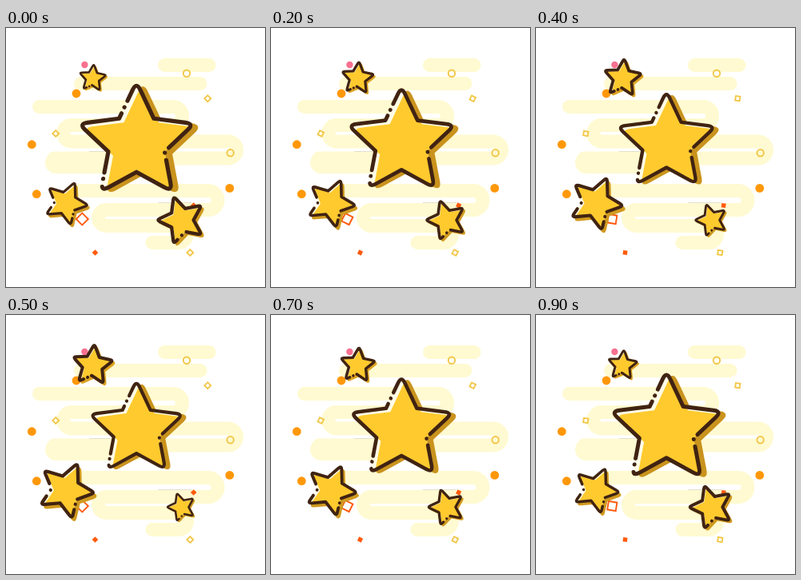
An HTML page that plays this animation: 324 by 324 pixels, repeating every 1 s.

```html
<!DOCTYPE html>
<html lang="en">
<head>
<meta charset="utf-8">
<title>Twinkling stars</title>
<style>
  html, body { margin: 0; width: 100%; height: 100%; overflow: hidden; background: #fff; }
  svg { display: block; width: 100%; height: 100%; }
</style>
</head>
<body>
<svg id="stage" viewBox="0 0 324 324">
  <g fill="none" stroke="#fffad1" stroke-width="17" stroke-linecap="round">
    <path d="M198.500 46.500H254"/>
    <path d="M93.500 69.500H243"/>
    <path d="M41.500 98.500H209a11.500 11.500 0 0 1 0 23H82a10.250 10.250 0 0 0 0 20.500H278a10.500 10.500 0 0 1 0 21H60"/>
    <path d="M90 203.500H253a12 12 0 0 1 0 24H125.500a10 10 0 0 0 0 20H216a10.500 10.500 0 0 1 0 21H183"/>
  </g>
  <rect x="49" y="155" width="126" height="27" rx="13.500" fill="#fffad1"/>
  <path d="M104 154.500H130M190 218.500H232" stroke="#cfcdb8" stroke-width=".6"/>
  <g fill="#ff9808">
    <circle cx="88" cy="82" r="5.400"/>
    <circle cx="32.300" cy="145.700" r="5.400"/>
    <circle cx="38.300" cy="207.700" r="5.400"/>
    <circle cx="279.800" cy="200.400" r="5.400"/>
  </g>
  <circle cx="98.400" cy="46" r="4.200" fill="#f87090"/>
  <g fill="none" stroke="#f2c84b" stroke-width="2">
    <circle cx="226" cy="56.700" r="4.200"/>
    <circle cx="280.700" cy="156.300" r="4.200"/>
  </g>
  <g id="squares"></g>
  <g id="stars"></g>
</svg>
<script>
const NS = 'http://www.w3.org/2000/svg';
const STEP = 100, STEPS = 10;

function add(parent, tag, attrs) {
  const el = document.createElementNS(NS, tag);
  for (const key in attrs) el.setAttribute(key, attrs[key]);
  parent.appendChild(el);
  return el;
}

function polar(radius, degrees) {
  const a = degrees * Math.PI / 180;
  return [radius * Math.sin(a), -radius * Math.cos(a)];
}

const mix = (a, b, f) => a.map((v, i) => v + (b[i] - v) * f);
const xy = p => p.map(v => v.toFixed(2)).join(' ');

// Five-pointed star with rounded tips, starting at the notch right of the top tip.
function starPath(turn) {
  let d = 'M' + xy(polar(37, 36 + turn));
  for (let i = 0; i < 5; i++) {
    const a = 36 + turn + i * 72;
    const tip = polar(76, a + 36), before = polar(37, a), after = polar(37, a + 72);
    d += `L${xy(mix(tip, before, 0.22))}Q${xy(tip)} ${xy(mix(tip, after, 0.22))}L${xy(after)}`;
  }
  return d + 'Z';
}

// Turns drawn stretches (in percent of the outline) into a dash pattern.
function dashes(parts) {
  return parts.map(([from, to], i) => {
    const next = i + 1 < parts.length ? parts[i + 1][0] : 100;
    return `${Math.max(to - from, 0.01)} ${next - to}`;
  }).join(' ');
}

// grow: change of size per step, relative to the starting size
const stars = [
  { x: 163.2, y: 143.2, size: 1, grow: -0.0385, turn: 0, line: 5.2, shade: [8, 2.5], shadow: '#c9931d',
    parts: [[0, 18.5], [20.3, 20.3], [22.3, 50.5], [52.6, 52.6], [54.3, 81.5], [83.3, 83.3], [85.2, 100]] },
  { x: 108.3, y: 62.8, size: 0.233, grow: 0.1, turn: 5, line: 11.5, shade: [8, 8], shadow: '#dca321',
    parts: [[0, 40], [43.2, 43.2], [46.5, 100]] },
  { x: 74.8, y: 218.9, size: 0.374, grow: 0.058, turn: 23.7, line: 8.8, shade: [7, 9], shadow: '#d09a1f',
    parts: [[0, 19.5], [22.7, 22.7], [25.7, 55], [59, 59], [63, 100]] },
  { x: 219.4, y: 240.3, size: 0.41, grow: -0.081, turn: -18, line: 10.5, shade: [8, 7], shadow: '#d09a1f',
    parts: [[0, 39], [43, 43], [47, 100]] }
];

const squares = [
  { x: 252.3, y: 88.2, side: 5.6, stroke: '#f2c84b' },
  { x: 62.3, y: 132, side: 5.6, stroke: '#f2c84b' },
  { x: 230.3, y: 281, side: 5.6, stroke: '#f2c84b' },
  { x: 95.3, y: 239, side: 10.6, stroke: '#ff5a0c' },
  { x: 111.5, y: 281, side: 5.4, fill: '#ff5a0c' },
  { x: 234.7, y: 222, side: 5.4, fill: '#ff5a0c' }
];

const starLayer = document.getElementById('stars');
const squareLayer = document.getElementById('squares');

stars.forEach((s, i) => {
  const d = starPath(s.turn);
  s.node = add(starLayer, 'g', {});
  add(add(s.node, 'clipPath', { id: 'body' + i }), 'path', { d });
  add(s.node, 'path', {
    d, fill: s.shadow, stroke: s.shadow, 'stroke-width': s.line * 0.6,
    'stroke-linejoin': 'round', transform: `translate(${s.shade})`
  });
  add(s.node, 'path', { d, fill: '#fffce6' });
  const inside = add(s.node, 'g', { 'clip-path': `url(#body${i})` });
  add(inside, 'path', { d, fill: '#ffca2e', transform: 'translate(6 5)' });
  add(s.node, 'path', {
    d, fill: 'none', stroke: '#402312', 'stroke-width': s.line, pathLength: 100,
    'stroke-linecap': 'round', 'stroke-linejoin': 'round', 'stroke-dasharray': dashes(s.parts)
  });
});

squares.forEach(q => {
  q.node = add(squareLayer, 'rect', {
    x: -q.side / 2, y: -q.side / 2, width: q.side, height: q.side,
    fill: q.fill || 'none', stroke: q.stroke || 'none', 'stroke-width': 1.9
  });
});

function draw(time) {
  const step = Math.floor(time / STEP) % STEPS;
  const swing = Math.min(step, STEPS - step);
  for (const s of stars) {
    s.node.setAttribute('transform', `translate(${s.x} ${s.y}) scale(${s.size * (1 + s.grow * swing)})`);
  }
  for (const q of squares) {
    q.node.setAttribute('transform', `translate(${q.x} ${q.y}) rotate(${45 + step * 360 / STEPS})`);
  }
}

const start = performance.now();
function tick() {
  draw(performance.now() - start);
  requestAnimationFrame(tick);
}
tick();
</script>
</body>
</html>
```
